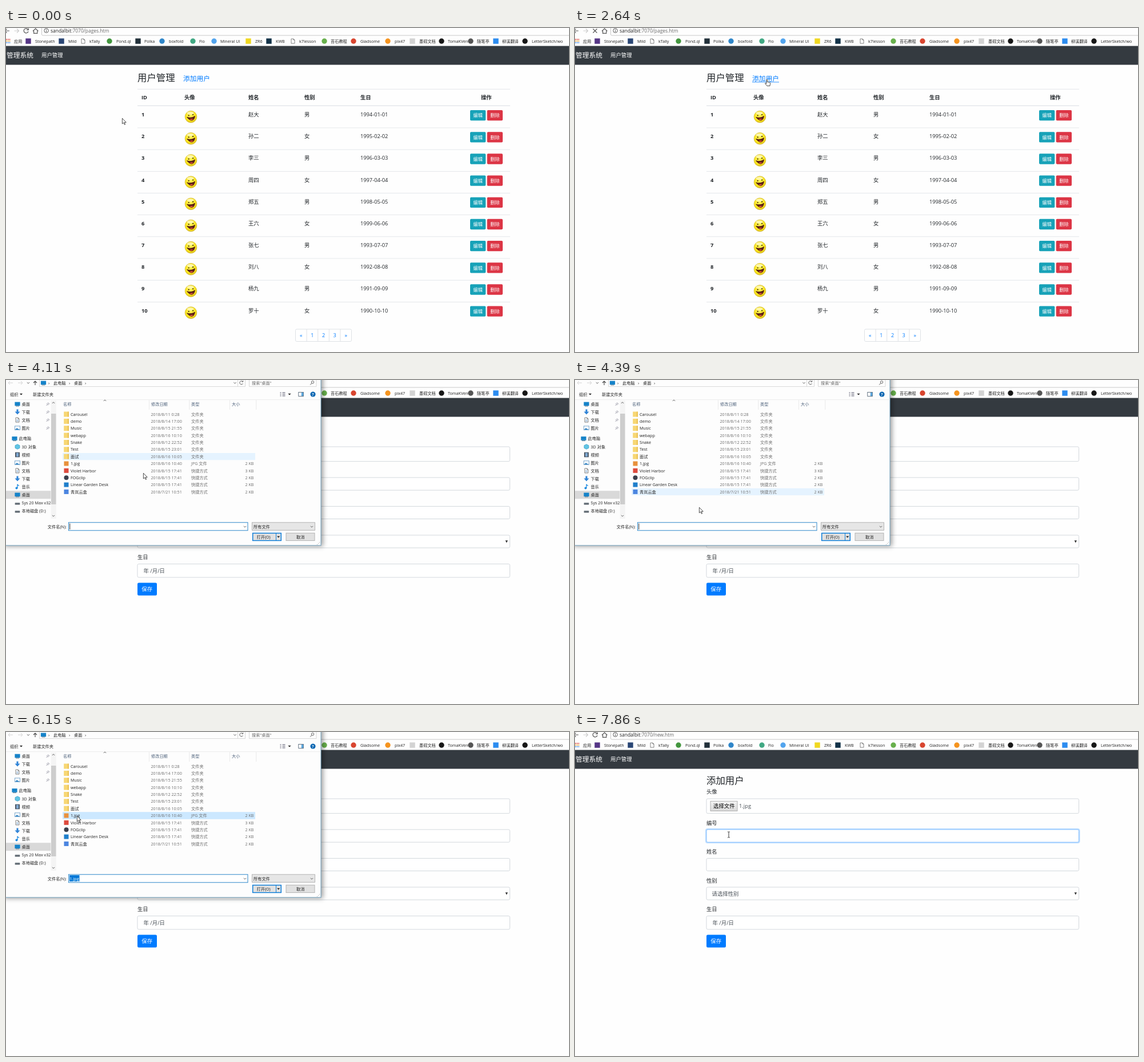
An HTML page for the animation above (8 s loop, 985 by 568 pixels).

```html
<!DOCTYPE html>
<html lang="zh-CN">
<head>
<meta charset="utf-8">
<style>
html, body { margin: 0; width: 100%; height: 100%; overflow: hidden; background: #fefefe; }
svg { display: block; width: 985px; height: 568px; }
text { font-family: "Open Sans", "Noto Sans CJK SC", "Noto Sans CJK", "Noto Sans", sans-serif; white-space: pre; }
</style>
</head>
<body>
<svg id="stage" viewBox="0 0 985 568"></svg>
<script>
const STEP = 137, LOOP = 8000;
const BLUE = '#007bff', INK = '#212529', LINE = '#dee2e6';

// Text is placed by its left edge (or anchor) and its vertical middle.
const text = (x, y, s, size = 9.35, fill = INK, more = '') =>
  `<text x="${x}" y="${y + size * .37}" font-size="${size}" fill="${fill}" ${more}>${s}</text>`;
const rect = (x, y, w, h, fill, more = '') =>
  `<rect x="${x}" y="${y}" width="${w}" height="${h}" fill="${fill}" ${more}/>`;
const dot = (x, y, r, fill) => `<circle cx="${x}" cy="${y}" r="${r}" fill="${fill}"/>`;
const path = (d, stroke, width = 1, fill = 'none') =>
  `<path d="${d}" stroke="${stroke}" stroke-width="${width}" fill="${fill}"/>`;
const group = (id, body, more = '') => `<g id="${id}" ${more}>${body}</g>`;
const MID = 'text-anchor="middle"', END = 'text-anchor="end"', BOLD = 'font-weight="700"';

const sheet = (x, y) => path(`M${x - 3} ${y - 4}h4l2 2v6h-6zM${x + 1} ${y - 4}v2h2`, '#666', .8, '#fff');
const folder = (x, y) => rect(x - 4.3, y - 4.5, 8.6, 9, '#f7d774') + rect(x + 2.6, y - 4.5, 1.7, 9, '#e8bd4e');

// Browser chrome
const bookmarks = [
  [39, 51, 'Stonepath', '#553586', 1], [97, 109, 'Mild', '#2a4675', 1], [135, 146, 'kTally'],
  [181, 193, 'Pond.ql', '#43963f'], [231, 242, 'Polka', '#22303a', 1], [273, 285, 'boxfold', '#2f86c9'],
  [327, 338, 'Fio', '#41a883'], [364, 375, 'Mineral UI', '#52a4ee'], [424, 436, 'ZR6', '#f0d820', 1],
  [460, 472, 'KWB', '#123248', 1], [502, 513, 'k7lesson'], [557, 568, '苔石教程', '#68b04c'],
  [608, 620, 'Gladsome', '#d8452f'], [668, 680, 'pix47', '#f5941f'], [711, 723, '墨砚文档', '#d3d3d3', 1],
  [762, 773, 'TomaKVen', '#171717'], [813, 824, '随笔亭', '#555'], [857, 868, '柳溪翻译', '#2c8cf0', 1],
  [908, 920, 'LetterSketch/wo', '#171717']
];

function browser() {
  const arrow = (x, dir, color) => path(`M${x - 4} 5h8M${x + 4 * dir - 3.5 * dir} 1.5L${x + 4 * dir} 5l${-3.5 * dir} 3.5`, color, 1.2);
  let s = rect(0, 0, 985, 31.5, '#fefefe') + arrow(2, -1, '#555') + arrow(18.5, 1, '#ccc');
  s += group('reload', path('M38.4 2.4A4 4 0 1 0 39 6M39.3 .5v3h-3', '#555', 1.2));
  s += group('stop', path('M31.5 1.5l7 7M38.5 1.5l-7 7', '#555', 1.2));
  s += path('M47 5.5L51.7 1l4.7 4.5M48.6 5v4.3h6.2V5', '#555', 1.2);
  s += path('M62.5 0V11q0 2 2 2H985', '#c8c8c8');
  s += `<circle cx="70.5" cy="4.6" r="3.7" fill="none" stroke="#555"/>` + rect(70, 4, 1, 3, '#555') + rect(70, 2.2, 1, 1, '#555');
  s += rect(78, 0, 100, 10, '#1f7fdc', 'id="urlMark"') + text(78, 4.6, '<tspan id="host">sandalbit</tspan><tspan id="page"></tspan>', 8.45, '#333');
  for (let i = 0; i < 9; i++)
    s += rect(.2 + i % 3 * 2.7, 19 + (i / 3 | 0) * 2.9, 1.8, 1.8, ['#e2574c', '#e8a33d', '#4a8fe0'][i / 3 | 0]);
  s += text(14, 23, '应用', 7.2, '#222');
  for (const [ix, tx, name, color, square] of bookmarks) {
    s += !color ? sheet(ix, 23) : square ? rect(ix - 4.7, 18.3, 9.4, 9.4, color) : dot(ix, 23, 4.7, color);
    s += text(tx, 23, name, 7.2, '#222');
  }
  return s + rect(0, 31.5, 985, 33, '#343a40') + text(1, 48, '管理系统', 11.75, '#fff') + text(62, 48, '用户管理', 9.4, '#fff');
}

// User list
function face(x, y) {
  return `<g transform="translate(${x} ${y})"><circle r="10.3" fill="url(#skin)" stroke="#c9ae24" stroke-width=".7"/>` +
    `<ellipse cx="-1" cy="-6.5" rx="6" ry="2.6" fill="#fff" opacity=".55"/>` +
    dot(-3.8, -2.3, 1.1, '#3c2a10') + dot(3.6, -3.6, 1.1, '#3c2a10') +
    path('M-7 .8Q1 3 7-1.2Q6 6.5 .5 6.3Q-3 5.5-7 .8z', '#4a1a12', .8, '#5d1f18') +
    path('M-2 4.6Q1 2.5 4 4.5Q1 7.2-2 4.6z', 'none', 0, '#e0503c') + '</g>';
}

function list() {
  const names = '赵大 孙二 李三 周四 郑五 王六 张七 刘八 杨九 罗十'.split(' ');
  const years = [1994, 1995, 1996, 1997, 1998, 1999, 1993, 1992, 1991, 1990];
  let s = text(230, 87, '用户管理', 16.4) + text(310, 88.5, '添加用户', 11.75, BLUE) +
    rect(310, 94.5, 47, .8, BLUE, 'id="underline"') + rect(230, 106.8, 652, .8, LINE) + rect(230, 135.6, 652, 1.2, LINE);
  [[237, 'ID'], [312, '头像'], [424, '姓名'], [522, '性别'], [620, '生日'], [831, '操作']]
    .forEach(([x, label]) => s += text(x, 122, label, 9.35, INK, BOLD));
  names.forEach((name, i) => {
    const y = 151.6 + 38.17 * i, day = String(i + 1).padStart(2, '0');
    if (i) s += rect(230, y - 15.2, 652, .8, LINE);
    s += text(237, y, i + 1, 9.35, INK, BOLD) + face(323.5, y + 4) + text(424, y, name) +
      text(522, y, '男女'[i % 2]) + text(620, y, `${years[i]}-${day}-${day}`, 9.25);
    [[812, '编辑', '#17a2b8'], [841.7, '删除', '#dc3545']].forEach(([x, label, color]) =>
      s += rect(x, y - 7.6, 27.3, 18.3, color, 'rx="1.8"') + text(x + 13.7, y + 1.7, label, 8.2, '#fff', MID + ' font-weight="500"'));
  });
  s += rect(506.5, 528, 98, 21.5, '#fff', `rx="2.3" stroke="${LINE}"`);
  ['«', 1, 2, 3, '»'].forEach((label, i) => {
    if (i) s += rect(506 + 19.6 * i, 528, 1, 21.5, LINE);
    s += text(516.3 + 19.6 * i, 539, label, 9, BLUE, MID);
  });
  return s;
}

// Form
function form() {
  const field = (y, h, more = '') => rect(230, y, 651.5, h, '#fff', `rx="2.3" stroke="#ced4da" stroke-width=".9" ${more}`);
  let s = text(230, 85, '添加用户', 16.4);
  [['头像', 105], ['编号', 159.5], ['姓名', 210], ['性别', 260.5], ['生日', 311]].forEach(([label, y]) => s += text(230, y, label));
  s += field(117, 25.7) + rect(237, 121.3, 47, 17.2, 'url(#grey)', 'stroke="#a9a9a9" stroke-width=".9"') + text(242, 130, '选择文件', 9.4, '#000');
  s += text(287, 130, '', 9.35, '#495057', 'id="picked"');
  s += field(171, 22.2) + field(221.5, 22) + field(272, 22.2) + field(322.5, 23.5);
  s += group('focus', rect(229, 170, 653.5, 24.2, 'none', 'rx="3" stroke="#bfdeff" stroke-width="2.2"') +
    rect(230, 171, 651.5, 22.2, '#fff', 'rx="2.3" stroke="#80bdff"'));
  s += rect(237, 176, 1, 13, '#333', 'id="caret"');
  s += text(239.5, 284, '请选择性别', 9.4, '#495057') + path('M873.6 281.2h4.4l-2.2 4.2z', 'none', 0, '#333');
  s += text(240.5, 335, '年 /月/日', 9.4, '#495057');
  return s + rect(230, 355.5, 34, 22.2, BLUE, 'rx="2.3"') + text(237.3, 366.7, '保存', 9.4, '#fff');
}

// File dialog
const ROW = 12.36, ROW_TOP = 53.8;
const files = [
  ['Carousel', '11 0:28'], ['demo', '14 17:00'], ['Music', '15 21:55'], ['webapp', '16 10:10'],
  ['Snake', '12 22:52'], ['Test', '15 23:01'], ['面试', '16 10:05'], ['1.jpg', '16 10:40', '#e8913c'],
  ['Violet Harbor', '15 17:41', '#dd4b3e'], ['FOGclip', '15 17:41', '#3a3f4c'],
  ['Linear Garden Desk', '15 17:41', '#1f7fcb'], ['青岚云盒', '', '#4c86e0']
];
const places = [
  [42, '桌面', 'pc'], [56, '下载', 'down'], [70, '文档', 'sheet'], [84, '图片', 'image'], [102.5, '此电脑', 'pc'],
  [117, '3D 对象', 'cube'], [131, '视频', 'film'], [145, '图片', 'image'], [159, '文档', 'sheet'],
  [173, '下载', 'down'], [187, '音乐', 'note'], [201, '桌面', 'pc'],
  [215.5, 'Sys 20 Max v32', 'disk'], [229.5, '本地磁盘 (D:)', 'disk']
];
const icons = {
  pc: (x, y) => rect(x - 4.6, y - 3.4, 9.2, 6.6, '#1683c9') + rect(x - 3, y + 3.5, 6, .9, '#4a6a80'),
  down: (x, y) => path(`M${x - 1.5} ${y - 4.5}h3v4h3l-4.5 5-4.5-5h3z`, 'none', 0, '#2f83d6'),
  sheet: (x, y) => sheet(x, y) + path(`M${x - 1.7} ${y}h3.4m-3.4 2h3.4`, '#5b8fc0', .8),
  image: (x, y) => rect(x - 4.5, y - 3.2, 9, 6.6, '#fff', 'stroke="#6a9cc5" stroke-width=".9"') + path(`M${x - 4} ${y + 3}l3-3 2 1.5 3 1.5z`, 'none', 0, '#3487c7'),
  cube: (x, y) => path(`M${x} ${y - 4.3}l4 2v4.6l-4 2-4-2v-4.6z`, '#2f9bc6', .7, '#62c5e4'),
  film: (x, y) => rect(x - 4, y - 4.3, 8, 8.6, '#4b5866') + rect(x - 2, y - 3.2, 4, 6.4, '#7fa9d2'),
  note: (x, y) => path(`M${x} ${y + 2.5}V${y - 4.3}q.5 2 3 2.7`, '#1d8ae0', 1.3) + dot(x - 1.5, y + 2.5, 2, '#1d8ae0'),
  disk: (x, y) => rect(x - 4.3, y, 8.6, 3, '#555f68') + rect(x - 4, y - 1, 8, 1, '#b5bcc2')
};
const chevron = (x, y, dir = 1) => path(`M${x - 2.2} ${y - dir}l2.2 ${2.2 * dir} 2.2 ${-2.2 * dir}`, '#555', .9);

function dialog() {
  const say = (x, y, s, fill = '#222', more) => text(x, y, s, 7.2, fill, more);
  const tri = (x, y) => path(`M${x - 2.6} ${y - 1.3}h5.2l-2.6 2.8z`, 'none', 0, '#222');
  let s = rect(-5, -64, 556, 354, '#fdfdfd', 'stroke="#6c9dbb" stroke-width="1" style="filter:drop-shadow(3px 1px 4px #0006)"');
  s += path('M4 5h8M7 2L4 5l3 3M21 5h8M26 2l3 3-3 3', '#d4d4d4') + chevron(39, 5) +
    path('M51 9V2M48 5l3-3 3 3', '#444', 1.1) + path('M58.5 0V11.5H418.5V0M405.5 0V11.5M425.5 0V11.5H543V0', '#d5d5d5', .9);
  s += icons.pc(65.5, 5) + say(74, 5, '›') + say(83, 5, '此电脑') + say(110, 5, '›') + say(119, 5, '桌面') + say(138, 5, '›');
  s += chevron(400.5, 5) + path('M413.8 2.5A3 3 0 1 0 414.6 6M414.7 1v2.2h-2.2', '#555', .9) + say(430, 5, '搜索"桌面"', '#666');
  s += `<circle cx="536.5" cy="3.8" r="2.2" fill="none" stroke="#555" stroke-width=".9"/>` + path('M535 5.5l-2.7 3', '#555');
  s += say(7, 25, '组织') + tri(26.5, 25) + say(47, 25, '新建文件夹') + tri(496, 25);
  for (let i = 0; i < 6; i++) s += rect(479.5 + i % 2 * 4, 21.5 + (i >> 1) * 2.8, i % 2 ? 5 : 2, 1.3, '#778');
  s += rect(511.8, 21.5, 8.6, 7, '#fff', 'stroke="#567" stroke-width=".9"') + rect(516.8, 22, 3.3, 6, '#5aa5dc') +
    dot(537, 25, 4.6, '#0b67b2') + text(537, 25, '?', 7, '#fff', MID + BOLD) + rect(0, 34, 551, .7, '#e7e7e7');

  s += rect(0, 194.3, 78.5, 14, '#d9d9d9');
  places.forEach(([y, label, icon], i) => {
    const left = i === 4 ? -5 : 0;
    s += icons[icon](20 + left, y) + say(27.5 + left, y, label);
    if (i < 4) s += path(`M70.5 ${y + 3}l2-2m-1.5-1.8l3 3m-1.6-3.8l2.6 2.6m-1.5-3.6l2.8 2.8`, '#889', .8);
  });
  s += rect(78.7, 36, 9, 207, '#f4f4f4') + rect(79, 59, 8.5, 159, '#cdcdcd') + chevron(83, 40, -1) + chevron(83, 238);

  [[100, '名称'], [254, '修改日期'], [324, '类型'], [395, '大小']].forEach(([x, label]) => s += say(x, 42.5, label, '#4c607a'));
  [250, 320.5, 391, 437.5].forEach(x => s += rect(x, 35, .7, 17, '#e2e2e2'));
  s += chevron(173, 36, -1);
  s += rect(99, 0, 337, ROW, '#e5f3ff', 'id="hover"') + rect(99, ROW_TOP + 7 * ROW, 337, ROW, '#cce8ff', 'id="chosen"');
  files.forEach(([name, stamp, color], i) => {
    const y = 60 + ROW * i, kind = i < 7 ? '文件夹' : i === 7 ? 'JPG 文件' : '快捷方式';
    s += !color ? folder(105.5, y) : i % 3 ? rect(101.5, y - 4, 8, 8, color) : dot(105.5, y, 4, color);
    s += say(113, y, name) + say(253.5, y, stamp ? '2018/8/' + stamp : '2018/7/21 10:51', '#6d6d6d') + say(324, y, kind, '#6d6d6d');
    if (color) s += say(433.5, y, (i === 8 ? 3 : 2) + ' KB', '#6d6d6d', END);
  });

  s += say(106, 257, '文件名(N):', '#222', END) + rect(109.5, 249.8, 313.5, 14, '#fff', 'stroke="#2c86c9"') + chevron(418, 257);
  s += group('typed', rect(111, 251, 17.5, 11, '#0078d7') + say(111.5, 257, '1.jpg', '#fff'));
  s += rect(111.3, 251.5, .9, 10.5, '#111', 'id="nameCaret"');
  s += rect(430.5, 249.8, 110, 13.6, '#e6e6e6', 'stroke="#adadad" stroke-width=".9"') + say(433, 257, '所有文件') + chevron(535, 257);
  s += rect(431.7, 268.5, 49.6, 13, '#e1e1e1', 'stroke="#0078d7" stroke-width="1.4" id="open"') + rect(472, 269, .9, 12, '#0078d7') + say(438.5, 275, '打开(O)') + tri(476.7, 275);
  s += rect(490, 268.3, 50, 13.3, '#e1e1e1', 'stroke="#adadad" stroke-width=".9"') + say(508, 275, '取消');
  for (let i = 0; i < 3; i++) s += rect(548 - i * 2, 284 + i * 2, 1, 1, '#aaa');
  return s;
}

const pointers =
  group('arrow', path('M.4 .3V10L2.7 7.9 4.3 11.5 5.7 10.9 4.1 7.4H7.2z', '#222', .8, '#fff')) +
  group('beam', path('M-2-5H-.6L0-4.4.6-5H2M0-4.4V4.4M-2 5H-.6L0 4.4.6 5H2', '#222', .9)) +
  group('hand', path('M0 .5q1-.9 1.6.3V4.5l4 .8q1 .4 1 1.4L6 11.5H.8L-2.6 7q.6-1.2 2.6.5z', '#222', .8, '#fff'));

const stage = document.getElementById('stage');
stage.innerHTML = `<defs><radialGradient id="skin" cx=".45" cy=".35" r=".7"><stop offset="0" stop-color="#fff35a"/><stop offset=".65" stop-color="#fbe51c"/><stop offset="1" stop-color="#d9b81a"/></radialGradient>
  <linearGradient id="grey" x2="0" y2="1"><stop stop-color="#f3f3f3"/><stop offset="1" stop-color="#d9d9d9"/></linearGradient></defs>` +
  rect(0, 0, 985, 568, '#fefefe') + browser() + group('list', list()) + group('form', form()) +
  group('dialog', dialog()) + group('pointer', pointers);

const el = {};
stage.querySelectorAll('[id]').forEach(node => el[node.id] = node);
const show = (id, on) => el[id].setAttribute('visibility', on ? 'inherit' : 'hidden');

// Pointer route: step, x, y
const route = [
  [0, 203, 158], [4, 190, 90], [8, 120, 5], [9, 114, 5], [11, 66, 137], [13, 28, 205], [14, 60, 226],
  [16, 345, 125], [17, 335, 90], [19, 335, 90], [22, 207, 65], [24, 250, 128], [26, 256, 130], [29, 256, 130],
  [31, 224, 196], [32, 217, 223], [33, 217, 223], [37, 150, 185], [40, 130, 153], [41, 124, 148],
  [44, 124, 147], [47, 452, 276], [48, 450, 275], [49, 407, 262], [53, 269, 180], [99, 269, 180]
];
function pointerAt(step) {
  const i = Math.max(1, route.findIndex(p => p[0] >= step));
  const [s0, x0, y0] = route[i - 1], [s1, x1, y1] = route[i];
  const u = Math.max(0, (step - s0) / (s1 - s0)), e = u * u * (3 - 2 * u);
  return [x0 + (x1 - x0) * e, y0 + (y1 - y0) * e];
}

// Opacity and scale of the dialog while it opens and closes
function dialogState(step) {
  if (step < 27 || step > 49) return [0, 1];
  return { 27: [.35, .95], 28: [.8, .985], 49: [.23, .963] }[step] || [1, 1];
}

function update(time) {
  const step = Math.floor((time + 10) / STEP);
  const adding = step >= 20, marked = step >= 9 && step < 18, loading = step >= 18 && step < 21;
  const [x, y] = pointerAt(step);
  const [alpha, scale] = dialogState(step), opened = alpha > 0;

  show('list', !adding);
  show('form', adding);
  show('reload', !loading);
  show('stop', loading);
  show('urlMark', marked);
  el.page.textContent = adding ? ':7070/new.htm' : ':7070/pages.htm';
  el.host.setAttribute('fill', marked ? '#fff' : '#222');
  el.page.setAttribute('fill', marked ? '#fff' : '#666');

  show('dialog', opened);
  el.dialog.setAttribute('opacity', alpha);
  el.dialog.setAttribute('transform', `translate(270 113) scale(${scale}) translate(-270 -113)`);
  // The row highlight trails the pointer by one step.
  const [hx, hy] = pointerAt(step - 1), row = Math.floor((hy - ROW_TOP) / ROW);
  show('hover', opened && step > 29 && hx > 99 && hx < 436 && row >= 0 && row < files.length);
  el.hover.setAttribute('y', ROW_TOP + row * ROW);
  const chosen = step >= 43;
  show('chosen', opened && chosen);
  show('typed', opened && chosen);
  show('nameCaret', opened && !chosen && Math.floor((time + 365) / 530) % 2 === 0);
  el.open.setAttribute('fill', x > 431 && y > 268 ? '#e5f1fb' : '#e1e1e1');

  el.picked.textContent = step >= 49 ? '1.jpg' : '未选择任何文件';
  show('focus', adding && step >= 53);
  el.focus.setAttribute('opacity', step === 53 ? .5 : 1);
  show('caret', adding && step >= 54 && step < 57);

  const onLink = !adding && x > 309 && x < 358 && y > 80 && y < 97;
  const onField = adding && x > 230 && (y > 171 && y < 193 || y > 221 && y < 243) && alpha < .3;
  const onText = onField || !opened && y < 12 && x > 64;
  show('underline', onLink);
  show('hand', onLink);
  show('beam', onText);
  show('arrow', !onLink && !onText);
  el.pointer.setAttribute('transform', `translate(${x} ${y})`);
}

function tick() {
  update(performance.now() % LOOP);
  requestAnimationFrame(tick);
}
tick();
</script>
</body>
</html>
```
